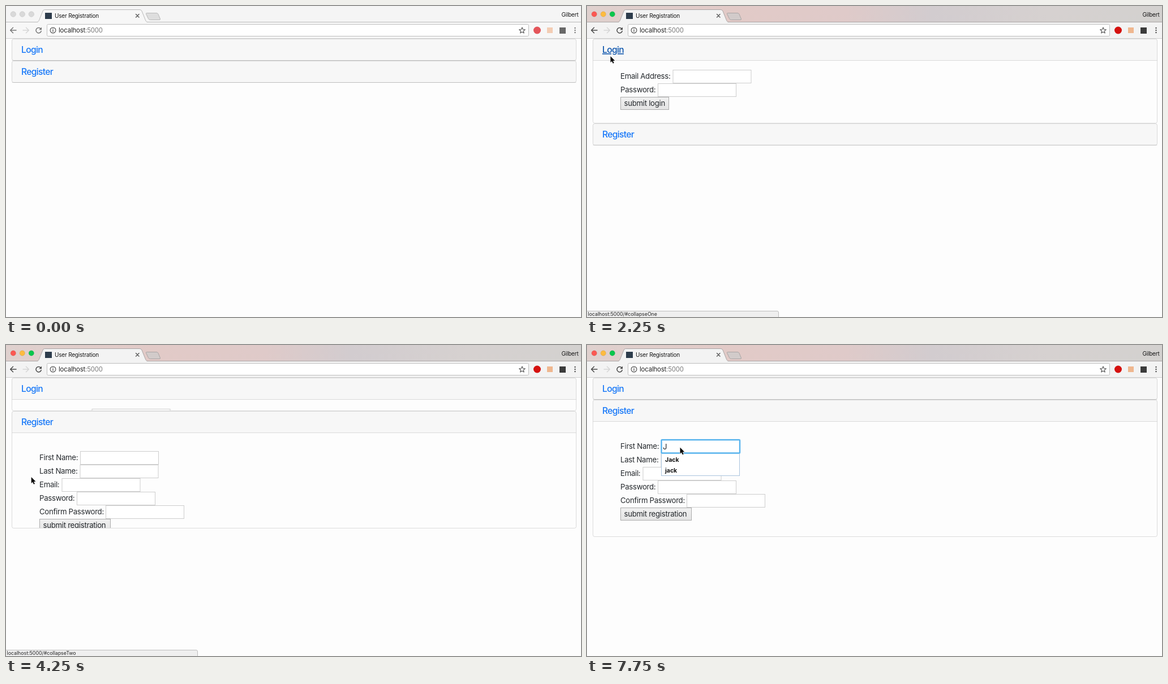
These frames come from a looping animation (1016x551 px, 8000 ms). An HTML page:

```html
<!DOCTYPE html>
<html lang="en">
<head>
<meta charset="utf-8">
<title>User Registration</title>
<style>
  html, body { margin: 0; width: 100%; height: 100%; overflow: hidden; background: #fdfdfd; }
  #stage { display: block; width: 1016px; height: 551px; }
  text { font-family: Inter, Roboto, "Open Sans", sans-serif; fill: #24282c; white-space: pre; }
  .chrome { font-size: 10px; letter-spacing: -.2px; fill: #161616; }
  .url { font-size: 11.3px; letter-spacing: -.13px; fill: #222; }
  .url tspan { fill: #777; }
  .head { font-size: 15.6px; font-weight: 500; letter-spacing: -.65px; fill: #1677f8; }
  .head.hover { fill: #0a53ac; text-decoration: underline; }
  .body { font-size: 13.2px; letter-spacing: -.28px; }
  .option { font-size: 10.5px; font-weight: 700; fill: #111; }
  .status { font-size: 8.8px; fill: #222; }
  .line { fill: none; stroke-linecap: round; stroke-linejoin: round; }
</style>
</head>
<body>
<svg id="stage" viewBox="0 0 1016 551" xmlns="http://www.w3.org/2000/svg">
  <defs>
    <linearGradient id="strip">
      <stop offset="0" stop-color="#dfd1ce"/>
      <stop offset=".25" stop-color="#e2cac7"/>
      <stop offset=".45" stop-color="#dfcac9"/>
      <stop offset=".6" stop-color="#d2cccf"/>
      <stop offset=".8" stop-color="#d6d1d0"/>
      <stop offset="1" stop-color="#d3d1cf"/>
    </linearGradient>
    <linearGradient id="button" x2="0" y2="1">
      <stop offset="0" stop-color="#f1f1f1"/>
      <stop offset="1" stop-color="#e4e4e4"/>
    </linearGradient>
  </defs>
  <rect width="1016" height="551" fill="#fdfdfd"/>
  <g id="page"></g>
  <g id="browser"></g>
  <g id="overlay"></g>
</svg>
<script>
const LOOP = 8000;
const HEAD = 39;
const TOP = 58;

// Each step overrides part of the state from its time on.
const steps = [
  [0, { active: false, pointer: null, beam: null, hover: '', status: '', statusAlpha: 1,
        loginBody: 0, registerBody: 0, focus: false, caret: 0, typed: '' }],
  [250, { beam: [866, 46] }],
  [500, { beam: null, pointer: [280, 72.5] }],
  [750, { pointer: [126.5, 91] }],
  [1000, { active: true, pointer: [128.5, 87.5] }],
  [1250, { pointer: [127, 89.5] }],
  [1500, { pointer: [50, 82], hover: 'Login' }],
  [1750, { pointer: [42, 78], status: 'One' }],
  [2250, { pointer: [41.5, 89], loginBody: 111 }],
  [2500, { pointer: [44, 147], hover: '', loginBody: 116 }],
  [2750, { pointer: [46, 250], status: '' }],
  [3000, { pointer: [45, 234], hover: 'Register', status: 'Two', statusAlpha: .5 }],
  [3250, { pointer: [44.7, 233.5], statusAlpha: 1 }],
  [4250, { pointer: [44.7, 234], hover: '', loginBody: 20, registerBody: 169 }],
  [4500, { pointer: [173, 200], loginBody: 0, registerBody: 204, statusAlpha: .4 }],
  [4750, { pointer: [164.5, 181.5], status: '' }],
  [5250, { focus: true, caret: 134.5 }],
  [5750, { caret: 0 }],
  [6250, { caret: 134.5 }],
  [6750, { caret: 0 }],
  [7000, { typed: 'J', caret: 142.5 }],
  [7500, { caret: 0 }]
];

const loginFields = [['Email Address:', 152], ['Password:', 125.5]];
const registerFields = [['First Name:', 131.5], ['Last Name:', 131], ['Email:', 99],
                        ['Password:', 125.5], ['Confirm Password:', 176.5]];

const text = (x, y, cls, str, extra = '') =>
  `<text x="${x}" y="${y}" class="${cls}" ${extra}>${str}</text>`;
const rect = (x, y, w, h, fill, extra = '') =>
  `<rect x="${x}" y="${y}" width="${w}" height="${h}" fill="${fill}" ${extra}/>`;
const path = (d, stroke, width = 1.4, extra = '') =>
  `<path d="${d}" class="line" stroke="${stroke}" stroke-width="${width}" ${extra}/>`;
const dot = (x, y, r, fill, extra = '') =>
  `<circle cx="${x}" cy="${y}" r="${r}" fill="${fill}" ${extra}/>`;

function starPoints(cx, cy, outer, inner) {
  return Array.from({ length: 10 }, (_, i) => {
    const r = i % 2 ? inner : outer;
    const a = i * Math.PI / 5 - Math.PI / 2;
    return `${(cx + r * Math.cos(a)).toFixed(2)},${(cy + r * Math.sin(a)).toFixed(2)}`;
  }).join(' ');
}

function browser(active) {
  const ink = active ? '#4a4a4a' : '#777';
  const bar = active ? '#f3f3f3' : '#f7f7f7';
  const edge = active ? '#aaa5a5' : '#b9b9b9';
  const lights = active ? ['#fb5852', '#fdbb40', '#08c64c'] : Array(3).fill('#d9d9d9');
  const rim = active ? 'rgba(0,0,0,.12)' : '#c9c9c9';
  return rect(0, 0, 1016, 28, active ? 'url(#strip)' : '#f5f5f5')
    + rect(0, 28, 1016, 30, bar)
    + path('M0 28.5H1016', edge, 1)
    + path('M0 57.5H1016', '#cfcfcf', 1)
    + lights.map((c, i) => dot(12.8 + 16 * i, 14.5, 4.7, c, `stroke="${rim}" stroke-width=".7"`)).join('')
    + `<path d="M55 29C57.5 28 58 26.500 59 24L65 9Q66 6.500 68.500 6.500H236Q239 6.500 240 9L246 24C247 26.500 247.500 28 250 29Z" fill="${bar}"/>`
    + path('M55 28.5C57.5 28 58 26.5 59 24L65 9Q66 6.5 68.5 6.5H236Q239 6.5 240 9L246 24C247 26.5 247.500 28 250 28.5', edge, 1)
    + `<path d="M248.500 12.500H266Q268 12.500 269 14.500L272.500 23Q273 24.500 271 24.500H254.500Q252.500 24.500 251.500 22.500L247.500 14Q247 12.500 248.500 12.500Z" fill="${active ? '#d2cbca' : '#dedede'}" stroke="${edge}"/>`
    + rect(69, 12, 12, 11, '#2d3c4c')
    + text(86, 21, 'chrome', 'User Registration')
    + path('M229.500 14.500L235 20M235 14.500L229.500 20', '#555', 1.4)
    + text(1011.5, 18.5, 'chrome', 'Gilbert', 'text-anchor="end"')
    + path('M18 43H8M12.500 38.200L7.700 43L12.500 47.800', ink, 1.5)
    + path('M30 43H40M35.500 38.200L40.300 43L35.500 47.800', '#d6d6d6', 1.5)
    + path('M61.300 40.200A4.700 4.700 0 1 0 62.200 44.500', ink, 1.5)
    + `<path d="M63 37.500V42.300H58.200Z" fill="${ink}"/>`
    + rect(72.5, 32.5, 851, 21, '#fff', 'rx="2" stroke="#bdbdbd"')
    + dot(83, 43, 4.9, 'none', 'stroke="#555" stroke-width="1.200"')
    + path('M83 42.500V45.500', '#555', 1.3)
    + dot(83, 40.4, .8, '#555')
    + text(93, 47.2, 'url', 'localhost<tspan>:5000</tspan>')
    + `<polygon points="${starPoints(912, 43.5, 5.6, 2.5)}" fill="none" stroke="#555" stroke-width="1.100" stroke-linejoin="round"/>`
    + dot(938.5, 43, 6.5, active ? '#d5110f' : '#e4555a')
    + rect(956, 38, 10, 10, active ? '#efb78f' : '#f3cdb4')
    + rect(978, 38, 11, 11, active ? '#3b3b3b' : '#686868')
    + [39, 43, 47].map(y => dot(1005.5, y, 1.2, ink)).join('');
}

function card(y, bodyHeight, title, hover, content) {
  const h = HEAD + bodyHeight;
  const line = 'rgba(0,0,0,.13)';
  return rect(10.5, y + .5, 997, h - 1, '#fdfdfd', 'rx="3"')
    + rect(10.5, y + .5, 997, HEAD - 1, '#f7f7f7', 'rx="3"')
    + path(`M11 ${y + HEAD - .5}H1007`, line, 1)
    + (bodyHeight ? `<svg x="0" y="${y + HEAD}" width="1016" height="${bodyHeight - 1}" overflow="hidden">${content}</svg>` : '')
    + rect(10.5, y + .5, 997, h - 1, 'none', `rx="3" stroke="${line}"`)
    + text(27, y + 25, hover === title ? 'head hover' : 'head', title);
}

// Form rows, measured from the top of the card body.
function form(top, fields, action, actionWidth) {
  const rows = fields.map(([label, x], i) => {
    const y = top + 24 * i;
    return text(59, y + 16, 'body', label)
      + rect(x, y + .5, 138, 23, '#fff', 'stroke="#cdcdcd"');
  }).join('');
  const y = top + 24 * fields.length;
  return rows
    + rect(59.5, y + .5, actionWidth, 22, 'url(#button)', 'stroke="#ababab"')
    + text(65.5, y + 15.5, 'body', action);
}

function page(s) {
  const registerTop = TOP + HEAD + s.loginBody;
  return card(TOP, s.loginBody, 'Login', s.hover, form(16, loginFields, 'submit login', 85))
    + card(registerTop, s.registerBody, 'Register', s.hover,
           form(32, registerFields, 'submit registration', 125));
}

function statusBubble(s) {
  return `<g opacity="${s.statusAlpha}">`
    + '<path d="M-1 552V540.500H336Q338.500 540.500 338.500 543V552Z" fill="#efefef" stroke="#bdbdbd"/>'
    + text(1.5, 549.3, 'status', `localhost:5000/#collapse${s.status}`) + '</g>';
}

function suggestions() {
  return rect(131.5, 191.5, 138, 40, '#fff', 'stroke="#a9c4de"')
    + text(138, 207, 'option', 'Jack')
    + text(138, 226, 'option', 'jack');
}

function overlay(s) {
  let out = '';
  if (s.typed) out += suggestions();
  if (s.focus) {
    out += rect(131.5, 168, 138.5, 23.5, '#fff', 'rx="1" stroke="#b5defa" stroke-width="3"')
      + rect(131.5, 168, 138.5, 23.5, 'none', 'rx="1" stroke="#52b1ec" stroke-width="1.800"')
      + text(134, 184.5, 'body', s.typed);
  }
  if (s.caret) out += rect(s.caret - .5, 172, 1, 15, '#111');
  if (s.status) out += statusBubble(s);
  if (s.beam) {
    const [x, y] = s.beam;
    out += path(`M${x - 3} ${y - 6.5}Q${x} ${y - 6.5} ${x} ${y - 4}V${y + 4}Q${x} ${y + 6.5} ${x - 3} ${y + 6.5}`
      + `M${x + 3} ${y - 6.5}Q${x} ${y - 6.5} ${x} ${y - 4}M${x} ${y + 4}Q${x} ${y + 6.5} ${x + 3} ${y + 6.5}`, '#222', 1);
  }
  if (s.pointer) {
    out += `<path transform="translate(${s.pointer})" d="M0 0V11L2.500 8.700L4.300 12.800L6.200 12L4.400 8H7.800Z" `
      + 'fill="#050505" stroke="#fff" stroke-width="1.400" stroke-linejoin="round" paint-order="stroke"/>';
  }
  return out;
}

const layer = id => document.getElementById(id);
let shown = -1;

function draw(now) {
  const t = now % LOOP;
  const past = steps.filter(([at]) => at <= t);
  if (past.length === shown) return;
  shown = past.length;
  const state = Object.assign({}, ...past.map(([, change]) => change));
  layer('page').innerHTML = page(state);
  layer('browser').innerHTML = browser(state.active);
  layer('overlay').innerHTML = overlay(state);
}

const start = performance.now();
function tick() {
  draw(performance.now() - start);
  requestAnimationFrame(tick);
}
tick();
</script>
</body>
</html>
```
